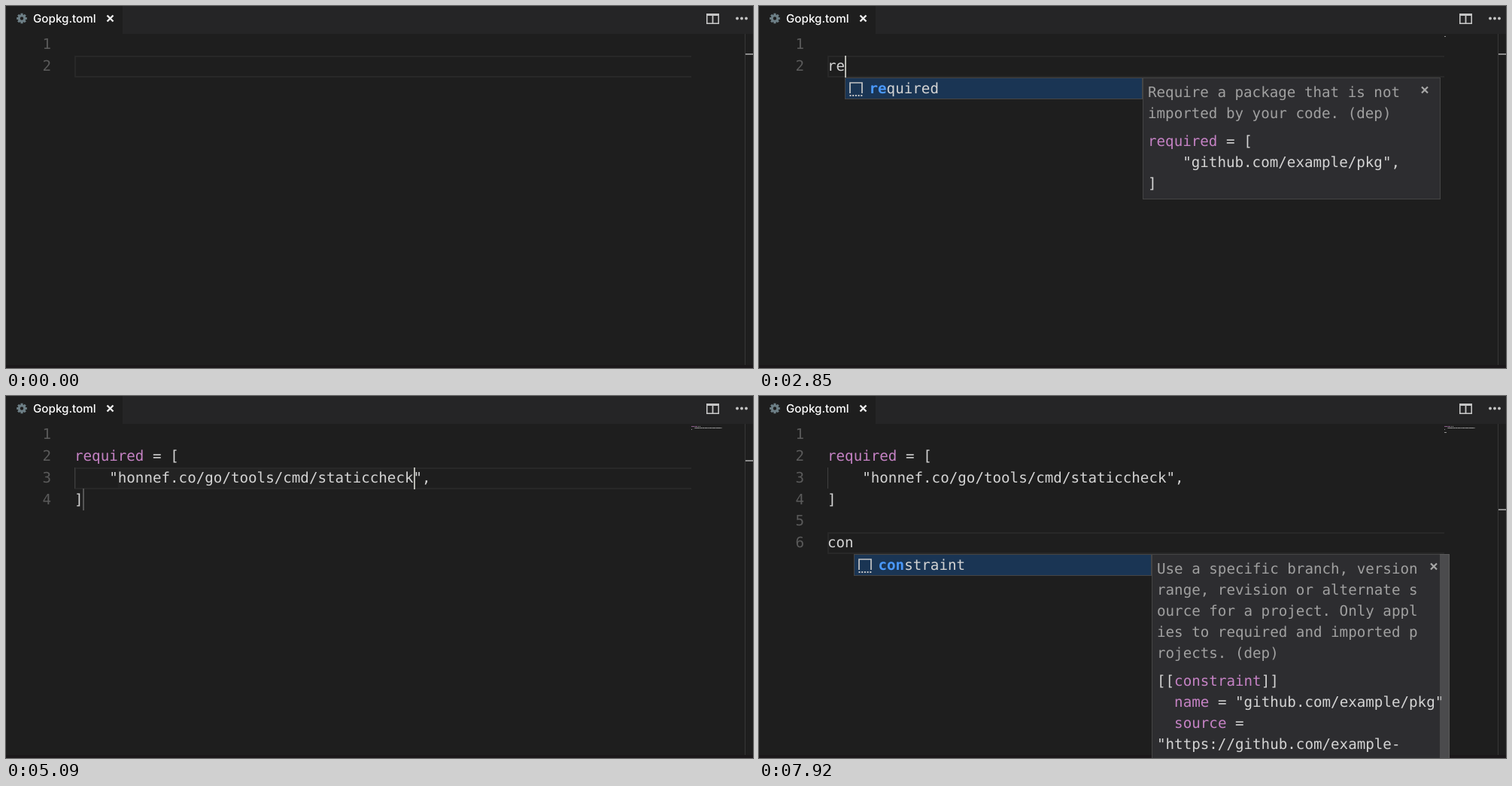
Write an HTML page with a canvas that moves like this. It is 993 by 481 pixels and loops after 8 s.

```html
<!DOCTYPE html>
<html lang="en">
<head>
<meta charset="utf-8">
<title>Gopkg.toml</title>
<style>
html, body { margin: 0; width: 100%; height: 100%; overflow: hidden; background: #1e1e1e; }
canvas { display: block; }
</style>
</head>
<body>
<canvas id="stage" width="993" height="481"></canvas>
<script>
const ctx = document.getElementById('stage').getContext('2d');
const LOOP = 8000, LEFT = 91, TOP = 37.3, CHAR = 11.56, LINE = 28.75;
const MONO = '19.2px "DejaVu Sans Mono", monospace';
const TEXT = '#d4d4d4', PURPLE = '#c582c4', BLUE = '#4a98fb', DOC = '#a0a0a0', BORDER = '#454545';
const RULER_Y = [42, 63, 85, 109, 130, 150];

// Braces mark purple words.
const REQUIRED = ['{required} = [', '    "github.com/example/pkg",', ']'];
const requiredDoc = {
  height: 162,
  rows: [[19, 'Require a package that is not', DOC], [47, 'imported by your code. (dep)', DOC],
         [84, REQUIRED[0]], [112, REQUIRED[1]], [140, REQUIRED[2]]]
};
const constraintDoc = {
  height: 300, scroll: true,
  rows: [...['Use a specific branch, version', 'range, revision or alternate s',
             'ource for a project. Only appl', 'ies to required and imported p',
             'rojects. (dep)'].map((s, i) => [19 + 28 * i, s, DOC]),
         ...['[[{constraint}]]', '  {name} = "github.com/example/pkg"', '  {source} =',
             '"https://github.com/example-'].map((s, i) => [168 + 28 * i, s])]
};
const before = ['', ''];
const filled = ['', REQUIRED[0], '    "honnef.co/go/tools/cmd/staticcheck",', ']'];
const typing = word => [...filled, '', word];

// Each step changes the state left by the one before it.
const steps = [
  [0, { lines: before, row: 1, col: 0, caret: false }],
  [300, { caret: true }],
  [750, { lines: ['', 'r'], col: 1, items: ['required'], doc: requiredDoc }],
  [900, { lines: ['', 're'], col: 2 }],
  [1350, { caret: false }],
  [1950, { caret: true }],
  [2400, { caret: false }],
  [2850, { caret: true }],
  [3140, { lines: ['', ...REQUIRED], row: 2, col: 27, items: null, doc: null,
           selected: true, endStop: true, slider: 0.32 }],
  [3590, { caret: false }],
  [4040, { lines: filled, col: 39, caret: true, selected: false, field: true, slider: 0 }],
  [4640, { caret: false }],
  [5090, { caret: true }],
  [5540, { row: 3, col: 1, field: false }],
  [5980, { caret: false }],
  [6280, { lines: [...filled, ''], row: 4, col: 0, caret: true, endStop: false }],
  [6430, { slider: 0.4 }],
  [6720, { lines: typing(''), row: 5 }],
  [7170, { lines: typing('c'), col: 1, items: ['cmd', 'co', 'constraint'] }],
  [7320, { lines: typing('co'), col: 2, items: ['co', 'constraint'] }],
  [7470, { lines: typing('con'), col: 3, items: ['constraint'], doc: constraintDoc }],
  [7920, { caret: false, slider: 0 }]
];

const lineY = row => TOP + LINE * row;
const colX = col => LEFT + CHAR * col;

function rect(x, y, w, h, color) {
  ctx.fillStyle = color;
  ctx.fillRect(x, y, w, h);
}

function frame(x, y, w, h, color, width = 1) {
  ctx.strokeStyle = color;
  ctx.lineWidth = width;
  ctx.strokeRect(x + width / 2, y + width / 2, w - width, h - width);
}

function text(s, x, y, color = TEXT, font = MONO) {
  ctx.font = font;
  ctx.fillStyle = color;
  ctx.fillText(s, x, y);
}

function code(s, x, y, color) {
  s.split(/[{}]/).forEach((part, i) => {
    text(part, x, y, i % 2 ? PURPLE : color);
    x += part.length * CHAR;
  });
}

function cross(x, y, r, color, width) {
  ctx.strokeStyle = color;
  ctx.lineWidth = width;
  ctx.beginPath();
  ctx.moveTo(x - r, y - r);
  ctx.lineTo(x + r, y + r);
  ctx.moveTo(x + r, y - r);
  ctx.lineTo(x - r, y + r);
  ctx.stroke();
}

function gear(x, y) {
  ctx.strokeStyle = '#6d7f86';
  ctx.lineWidth = 3;
  ctx.beginPath();
  ctx.arc(x, y, 3.7, 0, 7);
  ctx.stroke();
  for (let i = 0; i < 8; i++) {
    const a = i * Math.PI / 4, c = Math.cos(a), s = Math.sin(a);
    ctx.beginPath();
    ctx.moveTo(x + 4 * c, y + 4 * s);
    ctx.lineTo(x + 6.8 * c, y + 6.8 * s);
    ctx.stroke();
  }
}

function header() {
  rect(0, 0, 993, 37, '#252526');
  rect(0, 0, 155, 37, '#1e1e1e');
  gear(21, 16.5);
  text('Gopkg.toml', 36, 22, '#fff', '500 15.2px Inter, sans-serif');
  cross(138.5, 16.5, 4, '#eee', 2.4);
  frame(931, 10, 17, 14, '#c5c5c5', 1.6);
  rect(931, 10, 17, 3, '#c5c5c5');
  rect(938.6, 10, 1.8, 14, '#c5c5c5');
  for (const x of [972, 978, 984]) {
    ctx.fillStyle = '#c5c5c5';
    ctx.beginPath();
    ctx.arc(x, 16.5, 1.9, 0, 7);
    ctx.fill();
  }
}

function minimap(lines) {
  lines.forEach((line, row) => {
    let x = 911, color = TEXT;
    for (const ch of line) {
      if (ch === '{') color = PURPLE;
      else if (ch === '}') color = TEXT;
      else {
        ctx.globalAlpha = 'il.,"/'.includes(ch) ? 0.4 : 0.65;
        if (ch !== ' ') rect(x, 38 + 2 * row, 1, 1, color);
        x++;
      }
    }
  });
  ctx.globalAlpha = 1;
}

function itemIcon(x, y, isWord) {
  if (isWord) {
    frame(x, y + 7, 20, 17, '#c5c5c5', 1.5);
    text('abc', x + 2, y + 18.5, '#c5c5c5', '9px "DejaVu Sans Mono", monospace');
    return;
  }
  ctx.strokeStyle = '#c5c5c5';
  ctx.lineWidth = 1.7;
  ctx.beginPath();
  ctx.moveTo(x + 1.5, y + 21);
  ctx.lineTo(x + 1.5, y + 7);
  ctx.lineTo(x + 17.5, y + 7);
  ctx.lineTo(x + 17.5, y + 21);
  ctx.stroke();
  for (let i = 0; i < 5; i++) rect(x + 1 + 3.7 * i, y + 23, 2, 2, '#c5c5c5');
}

function popup({ items, doc, row, col }) {
  const x = Math.round(colX(col)), y = Math.round(lineY(row + 1)), h = 28.6 * items.length;
  rect(x, y, 396, h, '#2d2d30');
  rect(x, y, 396, 28.6, '#1a3554');
  frame(x, y, 396, Math.round(h), BORDER);
  items.forEach((item, i) => {
    const top = y + 28.6 * i;
    itemIcon(x + 5.5, top, item.length < 4);
    text(item.slice(0, col), x + 32.5, top + 21, BLUE, 'bold ' + MONO);
    text(item.slice(col), x + 32.5 + col * CHAR, top + 21);
  });
  if (!doc) return;
  const dx = x + 396;
  rect(dx, y, 396, doc.height, '#2d2d30');
  frame(dx, y, 396, doc.height, BORDER);
  for (const [dy, s, color] of doc.rows) code(s, dx + 7, y + dy + 7, color);
  cross(dx + 375, y + 16.5, 4, '#a8a8a8', 2.2);
  if (doc.scroll) rect(dx + 383, y, 13, doc.height, 'rgba(121,121,121,.4)');
}

function draw(now) {
  const t = now % LOOP;
  const s = Object.assign({}, ...steps.filter(step => step[0] <= t).map(step => step[1]));
  const y = lineY(s.row), cx = Math.round(colX(s.col));
  rect(0, 0, 993, 481, '#1e1e1e');
  header();

  if (s.selected) {
    ctx.fillStyle = '#38517a';
    ctx.beginPath();
    ctx.roundRect(colX(5), y, 22 * CHAR, LINE - 0.5, 3);
    ctx.fill();
  } else {
    const top = Math.round(y);
    if (s.field) rect(colX(5), top, 34 * CHAR, 28, '#232323');
    rect(LEFT, top, 820, 2, '#282828');
    rect(LEFT, top + 27, 820, 2, '#282828');
    rect(LEFT, top, 2, 29, '#282828');
  }
  if (s.lines.length > 2) rect(LEFT, 95, 1, 28, '#404040');
  if (s.endStop) rect(102, 123, 2, 29, '#555');

  s.lines.forEach((line, i) => {
    const base = lineY(i) + 20;
    text(i + 1, 48.5, base, '#5a5a5a');
    code(line, LEFT, base);
  });
  minimap(s.lines);

  rect(982, 37, 1, 444, '#383838');
  if (s.slider) rect(983, 37, 10, 444, `rgba(121,121,121,${s.slider})`);
  rect(983, RULER_Y[s.row], 10, 2, '#8c8c8c');
  rect(0, 477, 993, 4, '#1b181a');

  if (s.caret) rect(cx, Math.round(y), 2, 29, '#b8b8b2');
  if (s.items) popup(s);
  requestAnimationFrame(draw);
}

ctx.textRendering = 'geometricPrecision';
requestAnimationFrame(draw);
</script>
</body>
</html>
```
